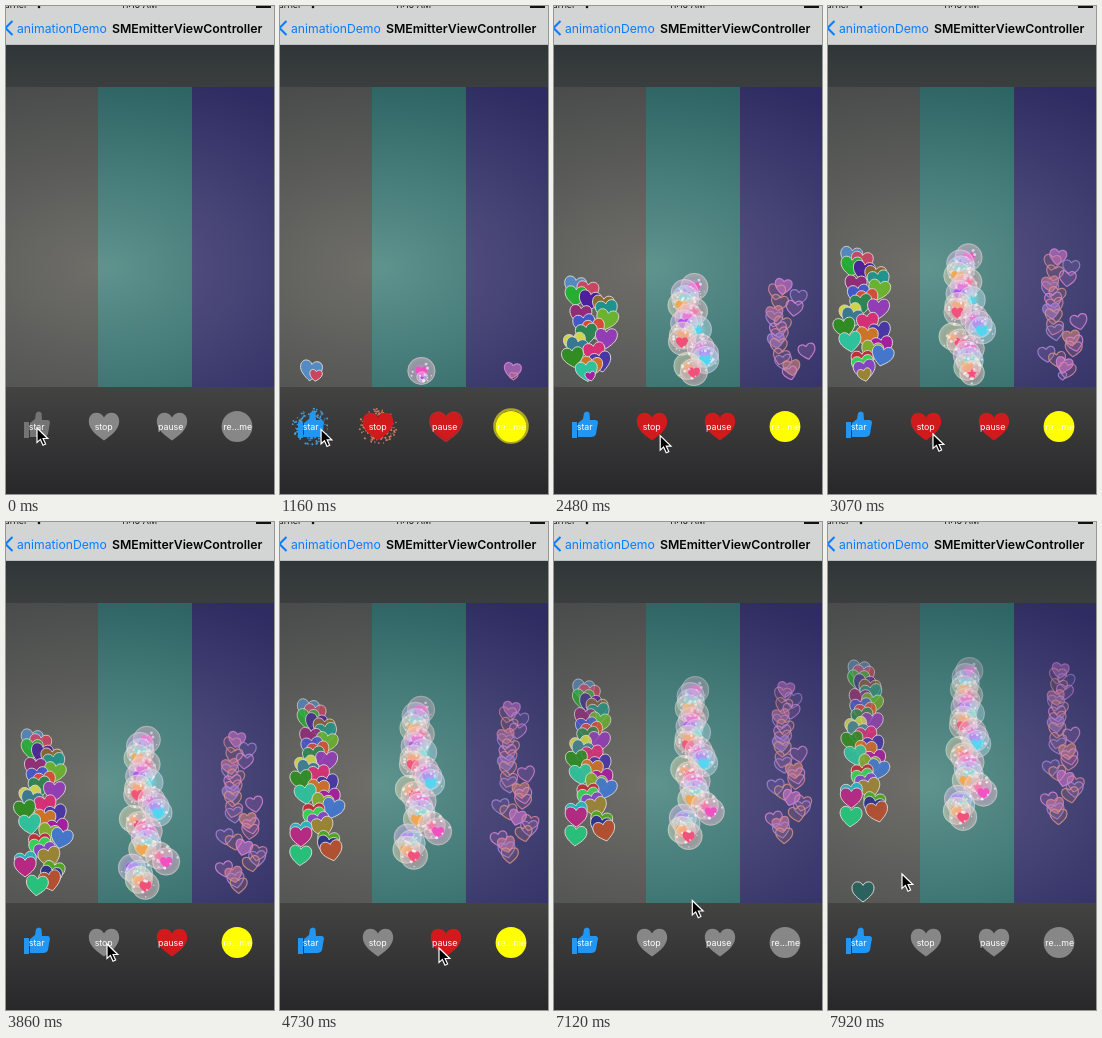
An HTML page with a canvas that plays this animation: 268x488 px, repeating every 8 s.

```html
<!DOCTYPE html>
<html lang="en">
<head>
<meta charset="utf-8">
<title>Emitter demo</title>
<style>
html, body { margin: 0; width: 100%; height: 100%; overflow: hidden; background: #333; }
canvas { display: block; width: 268px; height: 488px; }
</style>
</head>
<body>
<canvas id="stage" width="268" height="488"></canvas>
<script>
const ctx = document.getElementById('stage').getContext('2d');
const LOOP = 8000, START = 1080, STOP = 3650, PAUSE = 4900, RESUME = 6600, RESTART = 7830;
const FLOOR = 371;

// Cursor moves: start, end, x, y
const moves = [[START, 1700, 108, 432], [2000, 2800, 105, 428], [3100, 3500, 101, 422],
  [3950, 4560, 159, 426], [5350, 5440, 159, 455], [5700, 6060, 227, 415], [6750, 7390, 74, 352]];

const clamp = v => Math.max(0, Math.min(1, v));
const random = n => { const v = Math.sin(n * 91.7 + 13.1) * 43758.5; return v - Math.floor(v); };

// Height reached by the oldest particle; the pause takes no part in its age
function riseAt(t) {
  const age = Math.max(0, Math.min(t, PAUSE) - START) + Math.max(0, t - RESUME);
  return 310 * (1 - Math.exp(-.000245 * age));
}

function rect(x, y, w, h, fill) {
  ctx.fillStyle = fill;
  ctx.fillRect(x, y, w, h);
}

function disc(x, y, r, fill) {
  ctx.beginPath();
  ctx.arc(x, y, r, 0, 7);
  ctx.fillStyle = fill;
  ctx.fill();
}

function ring(x, y, r, color, width) {
  ctx.beginPath();
  ctx.arc(x, y, r, 0, 7);
  ctx.strokeStyle = color;
  ctx.lineWidth = width;
  ctx.stroke();
}

function text(str, x, y, font, color, align = 'center') {
  ctx.font = font + ' Inter, "Liberation Sans", sans-serif';
  ctx.textAlign = align;
  ctx.fillStyle = color;
  ctx.fillText(str, x, y);
}

function heart(x, y, r, fill, line, width = 1, turn = 0) {
  ctx.save();
  ctx.translate(x, y);
  ctx.rotate(turn);
  ctx.beginPath();
  ctx.moveTo(0, .9 * r);
  for (const s of [-r, r]) {
    ctx.moveTo(0, .9 * r);
    ctx.bezierCurveTo(.42 * s, .6 * r, s, .2 * r, s, -.35 * r);
    ctx.bezierCurveTo(s, -.72 * r, .77 * s, -.92 * r, .51 * s, -.92 * r);
    ctx.bezierCurveTo(.27 * s, -.92 * r, .1 * s, -.8 * r, 0, -.6 * r);
  }
  ctx.restore();
  if (fill) { ctx.fillStyle = fill; ctx.fill(); }
  if (line) { ctx.strokeStyle = line; ctx.lineWidth = width; ctx.stroke(); }
}

function star(x, y, r, fill) {
  ctx.beginPath();
  for (let i = 0; i < 10; i++) {
    const a = i * Math.PI / 5 - Math.PI / 2, k = i % 2 ? r * .45 : r;
    ctx.lineTo(x + Math.cos(a) * k, y + Math.sin(a) * k);
  }
  ctx.fillStyle = fill;
  ctx.fill();
}

// A panel lit by a wide glow around (95, 262)
function panel(x, w, inner, outer) {
  const wide = 1.5;
  ctx.save();
  ctx.scale(wide, 1);
  const g = ctx.createRadialGradient(95 / wide, 262, 5, 95 / wide, 262, 200);
  g.addColorStop(0, inner);
  g.addColorStop(1, outer);
  ctx.restore();
  ctx.save();
  ctx.beginPath();
  ctx.rect(x, 81, w, 300);
  ctx.clip();
  ctx.scale(wide, 1);
  rect(0, 81, 268, 300, g);
  ctx.restore();
}

function shade(y, h, from, to) {
  const g = ctx.createLinearGradient(0, y, 0, y + h);
  g.addColorStop(0, from);
  g.addColorStop(1, to);
  rect(0, y, 268, h, g);
}

function backdrop() {
  shade(39, 42, '#303638', '#3a3e3e');
  panel(0, 92, '#6e6d68', '#474a4a');
  panel(92, 94, '#5d928d', '#2a6161');
  panel(186, 82, '#5b5886', '#2e2c62');
  shade(381, 107, '#434342', '#28282b');

  rect(0, 0, 268, 39, '#d3d4d4');
  rect(0, 38.5, 268, .5, '#a5a5a5');
  text('Carrier', -8, 2, '9px', '#111', 'left');
  text('11:16 AM', 133, 2, '9px', '#111');
  disc(33, 1, 1.3, '#111');
  rect(250, 0, 15, 2, '#111');
  ctx.strokeStyle = '#087cff';
  ctx.lineWidth = 2;
  ctx.stroke(new Path2D('M6.5 15 -.5 22 6.5 29'));
  text('animationDemo', 11, 26.5, '12.2px', '#087cff', 'left');
  text('SMEmitterViewController', 106, 26.5, '600 12.3px', '#050505', 'left');
}

const tilt = i => (random(i + 40) - .5) * .6;

function solid(x, y, s, i) {
  const color = `hsl(${210 + i * 137.5}, ${45 + 25 * random(i + 5)}%, ${32 + 24 * random(i + 60)}%)`;
  heart(x, y, 11 * s, color, '#d9d5d2', 1, tilt(i));
}

function bubble(x, y, s, i) {
  const r = 14 * s, hue = [318, 275, 190, 32, 345][i % 5];
  const g = ctx.createRadialGradient(x, y, 0, x, y, r);
  g.addColorStop(0, `hsla(${hue}, 90%, 80%, .75)`);
  g.addColorStop(.6, `hsla(${hue}, 70%, 82%, .45)`);
  g.addColorStop(1, `hsla(${hue + 40}, 50%, 86%, .5)`);
  disc(x, y, r, g);
  ring(x, y, r - .5, '#f6e6f270', .8);
  const core = `hsl(${hue}, 85%, 63%)`;
  if (i % 3 === 1) star(x, y + 1, 6 * s, core);
  else heart(x, y + 1, 6 * s, core);
  for (let j = 0; j < 9; j++) {
    const a = random(i * 9 + j) * 6.28, d = r * (.3 + .6 * random(i * 5 + j + 80));
    disc(x + Math.cos(a) * d, y + Math.sin(a) * d, .6 + random(j + i), '#ffffffa0');
  }
}

function lineHeart(x, y, s, i) {
  const hue = [300, 340, 265, 368][i % 4];
  heart(x, y, 8.5 * s, `hsla(${hue}, 50%, 65%, ${i % 5 ? .18 : .6})`,
    `hsla(${hue}, 48%, 68%, .85)`, 1.2, tilt(i));
}

// Particles fan out above the floor, then gather and fade as they climb
function stream(count, center, reach, rise, seed, draw) {
  for (let i = 0; i < count; i++) {
    const d = rise - 146 * i / (count - 1);
    if (d <= 0) break;
    const fan = reach * clamp(d / 25) * (1 - d / 300);
    ctx.globalAlpha = 1 - (d / 290) ** 3;
    draw(center + (random(i + seed) * 2 - 1) * fan, FLOOR - d, clamp(.4 + d / 8), i);
  }
  ctx.globalAlpha = 1;
}

function sparks(x, y, p, color, seed) {
  ctx.globalAlpha = 1 - p * .75;
  for (let i = 0; i < 110; i++) {
    const a = random(i + seed) * 6.28, r = 12 + 10 * Math.sqrt(p) + (random(i * 3 + seed) - .5) * 8;
    disc(x + Math.cos(a) * r, y + Math.sin(a) * r, .5 + random(i + 7) * .6, color);
  }
}

function bursts(t) {
  const p = (t - START) / 1200;
  if (p <= 0 || p >= 1) return;
  sparks(31, 420, p, '#4b9fd8', 1);
  sparks(98, 420, p, '#df7a5c', 200);
  ctx.globalAlpha = 1 - p;
  heart(166, 421, 15 + 16 * p, null, '#c8282a', 1.5);
  ring(231, 420, 16 + 8 * p, '#b8b022', 2.5);
  ctx.globalAlpha = 1;
}

const hand = new Path2D('M18 416H23V432H18ZM24 417 29 413 30 407Q33 404 35.5 407L36 414H42' +
  'Q45 415 43.5 419L42 428Q41 431 37 431H24Z');

function buttons(t) {
  const tint = (end, color) => t >= START && t < end ? color : '#878787';
  ctx.fillStyle = t >= START ? '#2196f3' : '#747474';
  ctx.fill(hand);
  heart(98, 420.7, 15.2, tint(STOP, '#d11a1c'));
  heart(166, 420.7, 15.2, tint(PAUSE, '#d11a1c'));
  disc(231, 420.5, 15.4, tint(RESUME, '#ffff00'));
  ['star', 'stop', 'pause', 're...me'].forEach((label, i) =>
    text(label, 30.7 + 67 * i, 423.5, '8.8px', '#fff'));
}

function cursor(t) {
  let x = 31, y = 422;
  for (const [from, to, nx, ny] of moves) {
    const p = clamp((t - from) / (to - from));
    x += (nx - x) * p;
    y += (ny - y) * p;
  }
  ctx.save();
  ctx.translate(x, y);
  const arrow = new Path2D('M0 0V14.5L3.4 11.4 6 17.2 8.6 16 6.1 10.5H10.8Z');
  ctx.lineWidth = 1.2;
  ctx.strokeStyle = '#fff';
  ctx.fillStyle = '#000';
  ctx.fill(arrow);
  ctx.stroke(arrow);
  ctx.restore();
}

function frame(now) {
  const t = now % LOOP, rise = riseAt(t);
  backdrop();
  bursts(t);
  buttons(t);
  stream(32, 36, 25, rise, 3, solid);
  stream(25, 142, 21, rise, 300, bubble);
  stream(28, 234, 21, rise, 600, lineHeart);
  if (t >= RESTART) heart(35, 370, 11, '#2c625d', '#d9d5d2');
  cursor(t);
  requestAnimationFrame(frame);
}
requestAnimationFrame(frame);
</script>
</body>
</html>
```
